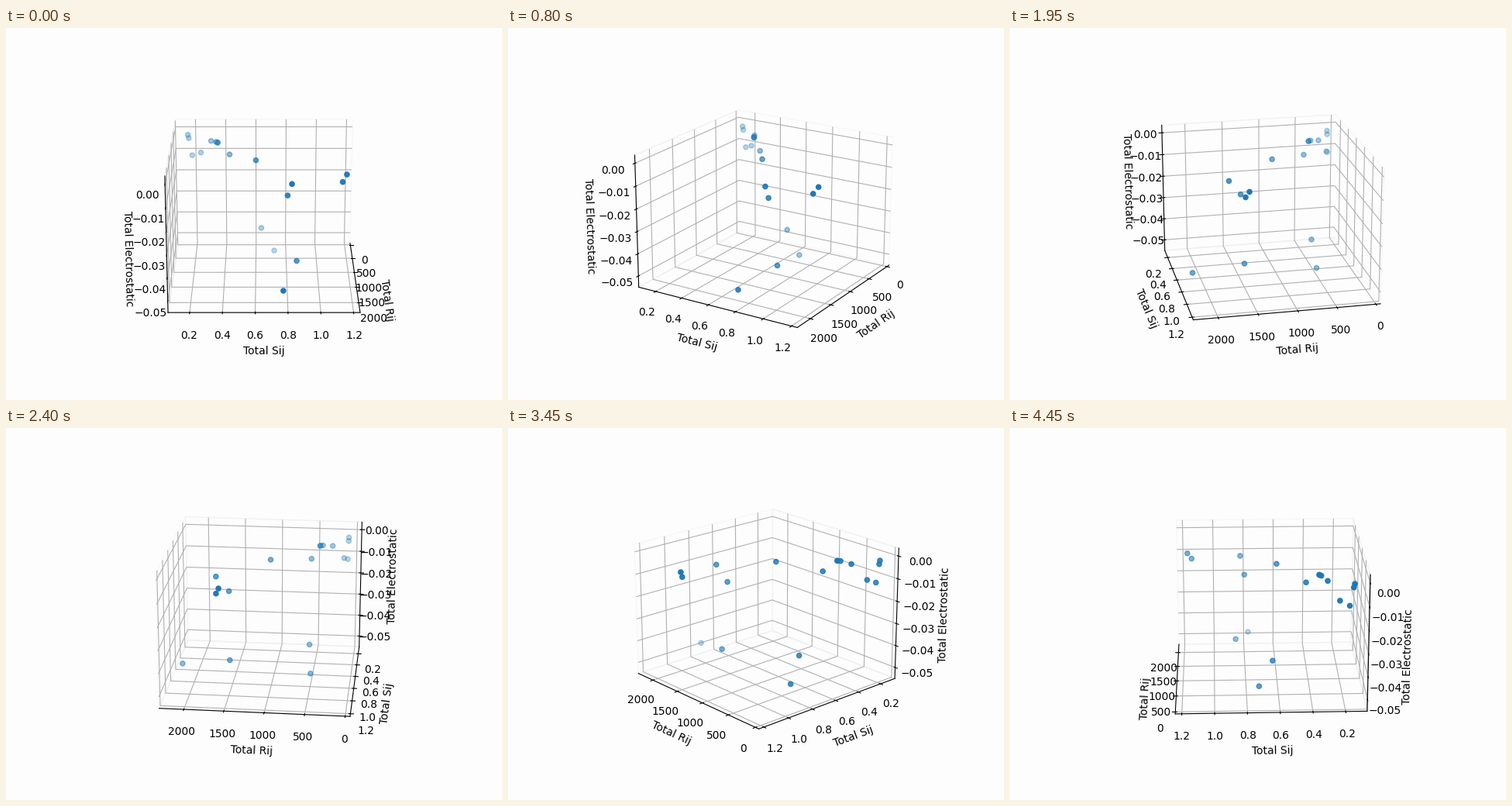
Animation of 640 by 480 pixels, one loop 4500 ms. Source, as a matplotlib script:

```python
import matplotlib.pyplot as plt
import numpy as np
from matplotlib.animation import FuncAnimation

FRAMES, INTERVAL = 90, 50
BACKGROUND = "#fdfdfd"


def rise(k, middle, slope):
    return 1 / (1 + np.exp(-slope * (k - middle)))


def cluster(count=8):
    """Weakly bound group: Rij and Sij step up while the energy dips once."""
    k = np.arange(count)
    rij = 100 + 355 * rise(k, 3.9, 2)
    sij = 0.15 + 0.205 * rise(k, 3.2, 1.5)
    energy = -0.002 - 0.011 * np.exp(-(k - 2.4) ** 2)
    return np.column_stack([rij, sij, energy])


def chain(start, end, count, bow):
    """Points spreading out from start to end, with the energy bowed upwards."""
    t = np.linspace(0, 1, count)[:, None] ** 1.2
    points = np.array(start) * (1 - t) + np.array(end) * t
    points[:, 2] += bow * np.sin(np.pi * t[:, 0])
    return points


# Rij, Sij, energy
outliers = [
    (1539, 0.80, -0.0136), (1572, 1.164, -0.0041), (1610, 1.138, -0.0069),
    (538, 0.636, -0.0403), (508, 0.721, -0.0513),
    (1519, 0.859, -0.0429), (2158, 0.772, -0.0476),
]
points = np.vstack([
    cluster(),
    chain((553, 0.431, -0.0063), (1696, 0.825, -0.0068), 3, bow=0.003),
    outliers,
])

plt.rcParams["font.family"] = "DejaVu Sans"
fig = plt.figure(figsize=(6.4, 4.8), dpi=100, facecolor=BACKGROUND)
ax = fig.add_subplot(projection="3d", facecolor=BACKGROUND)
ax.scatter(*points.T, s=20, color="#1f77b4")

ax.set(
    xlim=(-60, 2309), ylim=(0.068, 1.24), zlim=(-0.0551, 0.00346),
    xticks=np.arange(0, 2001, 500),
    yticks=np.arange(1, 7) / 5,
    zticks=np.arange(-5, 1) / 100,
    xlabel=" Total Rij", ylabel="Total Sij", zlabel="Total Electrostatic",
)
for axis in (ax.xaxis, ax.yaxis, ax.zaxis):
    axis.pane.fill = False

# Two degrees per step, kept just off 0 and 90 so the visible walls are unambiguous
AZIMUTHS = np.linspace(0.001, 177.999, FRAMES)


def update(frame):
    ax.view_init(elev=20, azim=AZIMUTHS[frame])
    return []


anim = FuncAnimation(fig, update, frames=FRAMES, interval=INTERVAL,
                     init_func=lambda: update(0), repeat=True)
plt.show()
```
